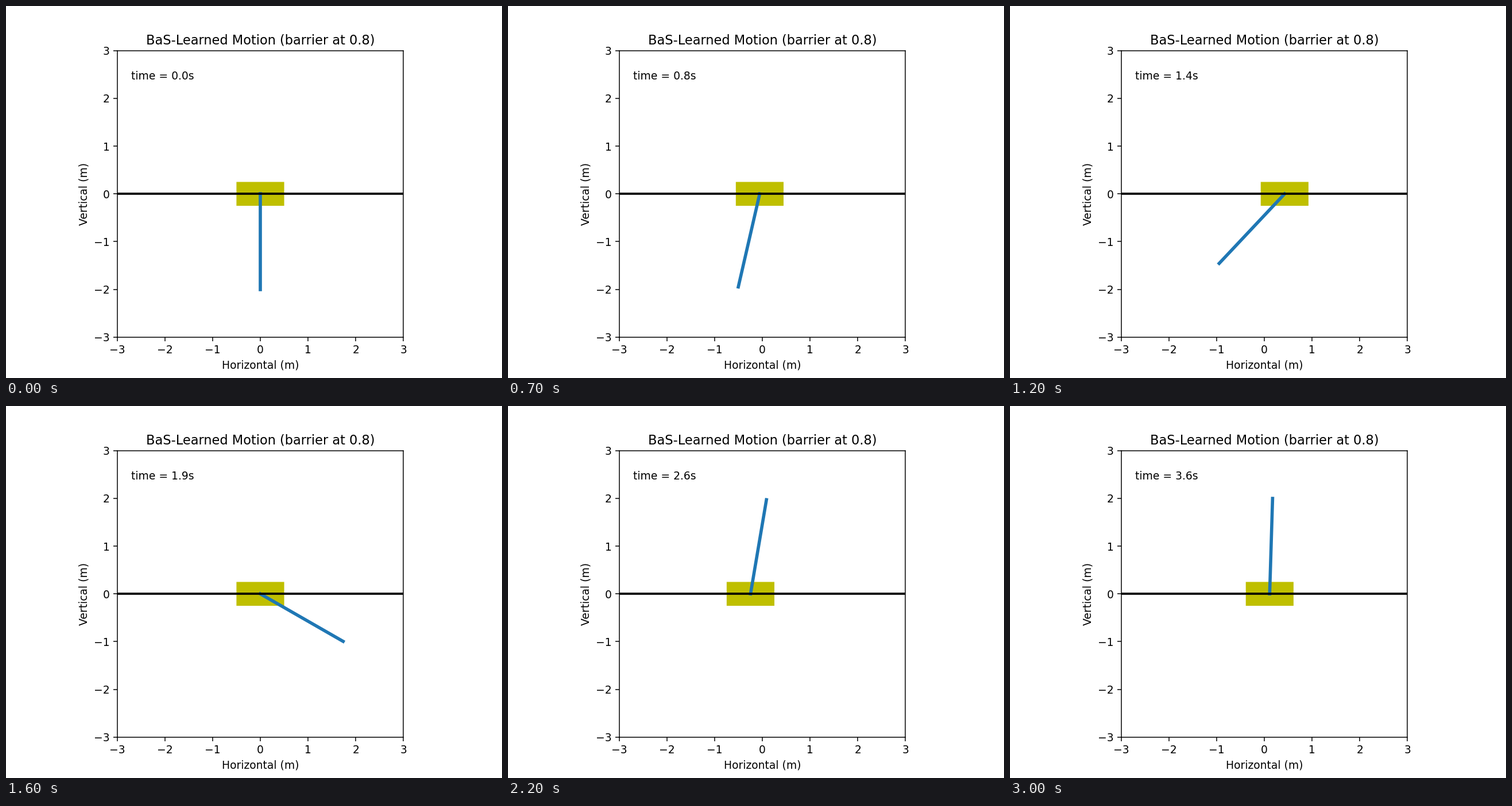
Write a matplotlib script that moves like this. It is 864x648 px and loops after 3100 ms.

```python
import numpy as np
import matplotlib.pyplot as plt
from matplotlib.animation import FuncAnimation
from matplotlib.patches import Rectangle

FRAMES, INTERVAL, DT = 31, 100, 0.12
POLE = 2.0
CART_W, CART_H = 1.0, 0.5

# Key poses: step, cart position (m), pole angle from hanging straight down (rad)
STEP, CART_X, ANGLE = np.array([
    (0, 0.0, 0.0),
    (4, -0.33, 0.22),
    (7, -0.055, -0.226),
    (10, 0.275, -1.01),
    (12, 0.425, -0.755),
    (14, 0.32, 0.27),
    (16, 0.0, 1.05),
    (19, -0.80, 1.99),
    (22, -0.247, 2.974),
    (26, 0.024, 3.150),
    (30, 0.112, 3.111),
]).T


def smooth(t, values):
    """Cubic curve through the key values, starting at rest."""
    slopes = np.gradient(values, STEP)
    slopes[0] = 0
    i = min(np.searchsorted(STEP, t, side="right"), len(STEP) - 1) - 1
    h = STEP[i + 1] - STEP[i]
    s = (t - STEP[i]) / h
    return ((1 + 2 * s) * (1 - s) ** 2 * values[i]
            + s * (1 - s) ** 2 * h * slopes[i]
            + s * s * (3 - 2 * s) * values[i + 1]
            + s * s * (s - 1) * h * slopes[i + 1])


fig = plt.figure(figsize=(6.4, 4.8), dpi=135)
# Centre the square axes on x = 443 px.
side, centre = 0.77 * 648 / 864, 443 / 864
ax = fig.add_axes((centre - side / 2, 0.11, side, 0.77), xlim=(-3, 3), ylim=(-3, 3))
ax.set_title("BaS-Learned Motion (barrier at 0.8)")
ax.set_xlabel("Horizontal (m)")
ax.set_ylabel("Vertical (m)")

cart = ax.add_patch(Rectangle((0, -CART_H / 2), CART_W, CART_H,
                              color="y", lw=0, snap=False))
pole, = ax.plot([], [], color="C0", lw=3)
ax.plot([-3, 3], [0, 0], color="k", lw=2)
clock = ax.text(0.05, 0.9, "", transform=ax.transAxes)


def draw(step):
    x, angle = smooth(step, CART_X), smooth(step, ANGLE)
    cart.set_x(x - CART_W / 2)
    pole.set_data([x, x + POLE * np.sin(angle)], [0, -POLE * np.cos(angle)])
    clock.set_text(f"time = {step * DT:.1f}s")
    return cart, pole, clock


anim = FuncAnimation(fig, draw, frames=FRAMES, init_func=lambda: draw(0),
                     interval=INTERVAL, repeat=True, repeat_delay=0)
plt.show()
```
